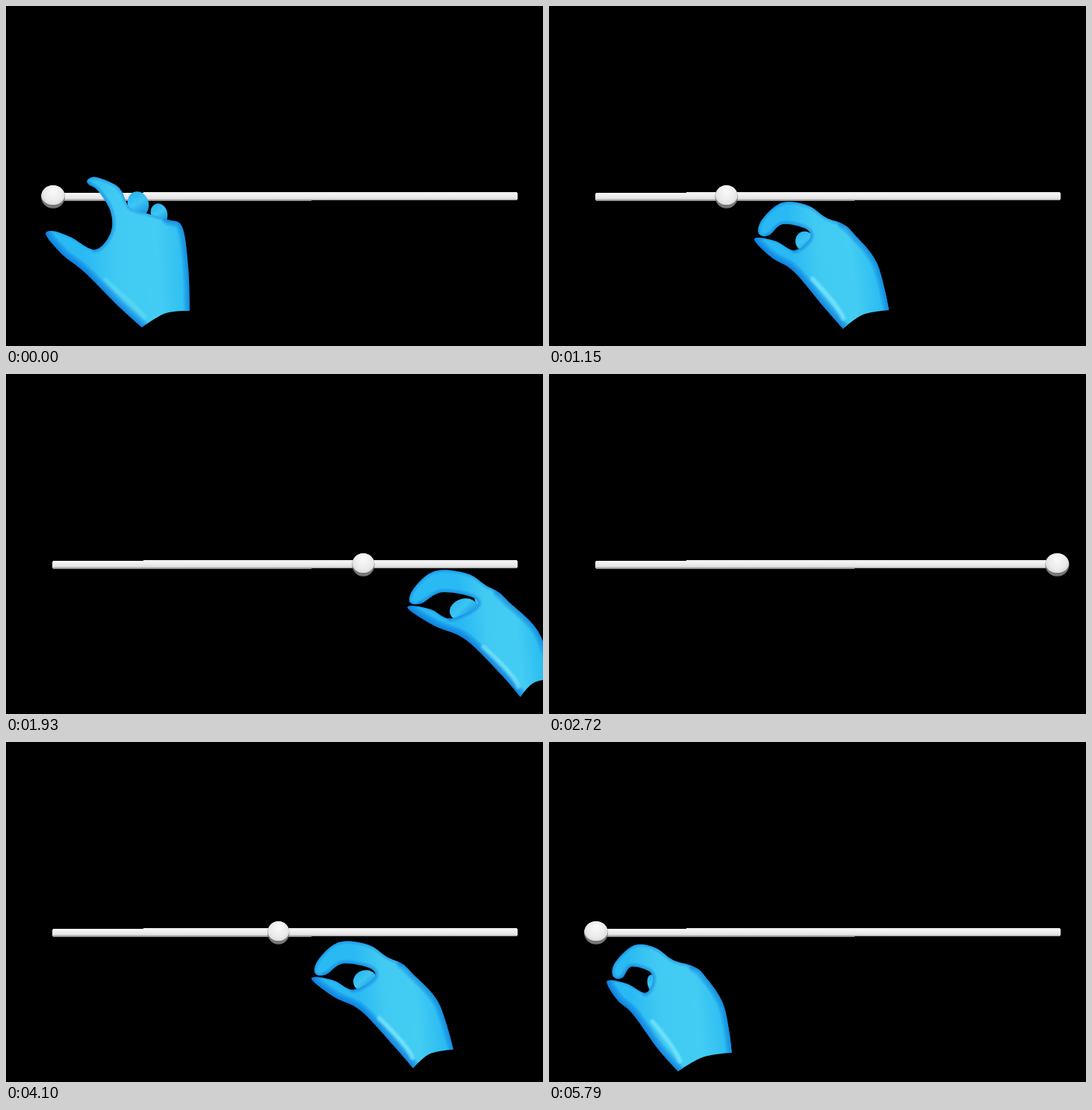
Write an HTML page with a canvas that moves like this. It is 719 by 455 pixels and loops after 5.87 s.

```html
<!DOCTYPE html>
<html lang="en">
<head>
<meta charset="utf-8">
<title>Hand and slider</title>
<style>
html, body { margin: 0; width: 100%; height: 100%; overflow: hidden; background: #000; }
canvas { display: block; }
</style>
</head>
<body>
<canvas id="stage" width="719" height="455"></canvas>
<script>
const ctx = document.getElementById('stage').getContext('2d');
const LOOP = 5870, STEP = LOOP / 76;
const LEFT = 63, RIGHT = 683;

// Per point: open x, y; pinched x (from the thumb tip), y; sideways swing as the wrist turns
const hand = [
  [182,430, 95,441, 39], [152,403, 68,411, 40], [105,356, 34,364, 30], [76,333, 14,346, 15],
  [54,307, 0,324, 0], [62,301, 5,319, 0], [86,309, 27,324, 2], [119,326, 51,336, 3],
  [140,304, 61,320, 21], [140,275, 56,307, 20], [123,247, 32,301, 8], [111,239, 20,316, -3],
  [109,233, 8,314, -5], [120,229, 9,298, -3], [144,238, 28,277, -2], [155,248, 45,271, 2],
  [166,270, 67,277, 10], [190,278, 88,292, 11], [217,286, 116,301, 3], [236,296, 131,314, 2],
  [244,350, 156,353, 12], [246,408, 167,416, 21], [214,411, 128,422, 28]
];
const WRIST_LEFT = 0, THUMB = 4, WEB = 7, INDEX = 11, KNUCKLE = 18, WRIST_RIGHT = 21;

const pull = [[610, LEFT], [770, 96], [1220, 260], [1470, 336], [2470, 645], [2720, RIGHT]];

const clamp = v => Math.max(0, Math.min(1, v));
const mix = (a, b, k) => a + (b - a) * k;
const mixPoint = (p, q, k) => [mix(p[0], q[0], k), mix(p[1], q[1], k)];

function track(keys, t) {
  let i = 0;
  while (i < keys.length - 2 && t > keys[i + 1][0]) i++;
  const [t0, v0] = keys[i], [t1, v1] = keys[i + 1];
  return mix(v0, v1, clamp((t - t0) / (t1 - t0)));
}

// Pulled to the right, a rest, then an eased way back that is joined late
function ballAt(t) {
  if (t < 3240) return track(pull, t);
  const u = clamp((t - 2739) / 2664);
  return mix(LEFT, RIGHT, (1 + Math.cos(Math.PI * u)) / 2);
}

function curve(pts, from = 0, count = pts.length) {
  const n = pts.length;
  const at = i => pts[(i + n) % n];
  const tangent = i => {
    const j = (i + n) % n;
    if (j === WRIST_LEFT || j === WRIST_RIGHT) return [0, 0];
    return [(at(i + 1)[0] - at(i - 1)[0]) / 6, (at(i + 1)[1] - at(i - 1)[1]) / 6];
  };
  const path = new Path2D();
  path.moveTo(...at(from));
  for (let i = from; i < from + count; i++) {
    const p = at(i), q = at(i + 1), u = tangent(i), v = tangent(i + 1);
    path.bezierCurveTo(p[0] + u[0], p[1] + u[1], q[0] - v[0], q[1] - v[1], q[0], q[1]);
  }
  return path;
}

function softStroke(path, rgb, width, alpha) {
  const layers = 8;
  ctx.strokeStyle = `rgba(${rgb},${alpha / layers})`;
  for (let i = 1; i <= layers; i++) {
    ctx.lineWidth = width * i / layers;
    ctx.stroke(path);
  }
}

function drawBar() {
  const g = ctx.createLinearGradient(0, 249, 0, 261);
  g.addColorStop(0, '#e6e6e6');
  g.addColorStop(0.2, '#f4f4f4');
  g.addColorStop(0.75, '#e2e2e2');
  g.addColorStop(0.85, '#b0b0b0');
  g.addColorStop(1, '#7c7c7c');
  ctx.fillStyle = g;
  ctx.fillRect(62, 251, 1, 9);
  ctx.fillRect(63, 250, 121, 11);
  ctx.fillRect(184, 249, 225, 12);
  ctx.fillRect(409, 249, 275, 11);
  ctx.fillRect(684, 250, 1, 9);
}

function drawBall(x) {
  const side = (x - (LEFT + RIGHT) / 2) / 310;
  const rx = 14.6 + 1.4 * Math.abs(side);
  ctx.save();
  ctx.beginPath();
  ctx.ellipse(x, 255.3, rx, 15.5, 0, 0, 7);
  ctx.fillStyle = '#777';
  ctx.fill();
  ctx.clip();
  const g = ctx.createRadialGradient(x, 247, 2, x, 252, 18);
  g.addColorStop(0, '#f8f8f8');
  g.addColorStop(0.6, '#ebebeb');
  g.addColorStop(1, '#d2d2d2');
  ctx.fillStyle = g;
  ctx.beginPath();
  ctx.ellipse(x, 252.8, rx, 13.3, 0, 0, 7);
  ctx.fill();
  ctx.restore();
}

function drawFinger(x, y, rx, ry) {
  const path = new Path2D();
  path.ellipse(x, y, rx, ry, -0.3, 0, 7);
  const g = ctx.createLinearGradient(x - rx, y - ry, x + rx / 2, y + ry);
  g.addColorStop(0, '#25aef0');
  g.addColorStop(0.5, '#3cc6f3');
  g.addColorStop(1, '#1591e0');
  ctx.fillStyle = g;
  ctx.fill(path);
}

function drawHand(t, ball) {
  const turn = Math.min((ball - LEFT) / 299, 1.8);
  const grip = clamp(t / 640);
  const close = grip * grip * (3 - 2 * grip);
  const tipX = 78 + (ball - LEFT) * 1.1 + 8 * (1 - clamp(t / 4600));
  const dy = -10 + 10 * t / LOOP - 1.5 * turn;
  if (tipX > 722) return;

  const place = ([ox, oy, px, py, swing]) =>
    [mix(ox, tipX + px + swing * turn, close), mix(oy, py + dy, close)];
  const pts = hand.map(place);

  drawFinger(...place([205, 278, 95, 310, 3]), 11, 14);
  const [mx, my] = place([177, 265, 62, 324, 8]);
  const mrx = mix(14, 8 + 8 * turn, close), mry = mix(17, 13 + turn, close);
  drawFinger(mx, my, mrx, mry);

  const body = curve(pts);
  const g = ctx.createLinearGradient(...pts[2], ...pts[20]);
  g.addColorStop(0, '#2abaf3');
  g.addColorStop(0.3, '#40c9f2');
  g.addColorStop(0.7, '#44cdf3');
  g.addColorStop(1, '#2cbdf1');
  ctx.fillStyle = g;
  ctx.fill(body);

  ctx.save();
  ctx.clip(body);
  ctx.lineCap = ctx.lineJoin = 'round';
  const deep = '0,105,215';
  softStroke(curve(pts, WRIST_LEFT, THUMB), deep, 20, 1);
  softStroke(curve(pts, THUMB, WEB - THUMB), deep, 6, 0.3);
  softStroke(curve(pts, WEB, INDEX - WEB), deep, 11, 0.6);
  softStroke(curve(pts, INDEX, KNUCKLE - INDEX), deep, 9, 0.4);
  softStroke(curve(pts, KNUCKLE, WRIST_RIGHT - KNUCKLE), deep, 17, 0.75);

  // Gloss at the base of the thumb
  const shine = new Path2D();
  shine.moveTo(...mixPoint(pts[2], pts[WRIST_RIGHT], 0.2));
  shine.quadraticCurveTo(
    ...mixPoint(pts[1], pts[WRIST_RIGHT], 0.25),
    ...mixPoint(pts[WRIST_LEFT], pts[KNUCKLE], 0.1));
  softStroke(shine, '150,238,255', 9, mix(0.25, 0.75, close));
  ctx.restore();
}

function frame() {
  const t = Math.floor((performance.now() % LOOP + 8) / STEP) * STEP % LOOP;
  const ball = ballAt(t);
  ctx.fillStyle = '#000';
  ctx.fillRect(0, 0, 719, 455);
  drawBar();
  drawBall(ball);
  drawHand(t, ball);
  requestAnimationFrame(frame);
}
frame();
</script>
</body>
</html>
```
